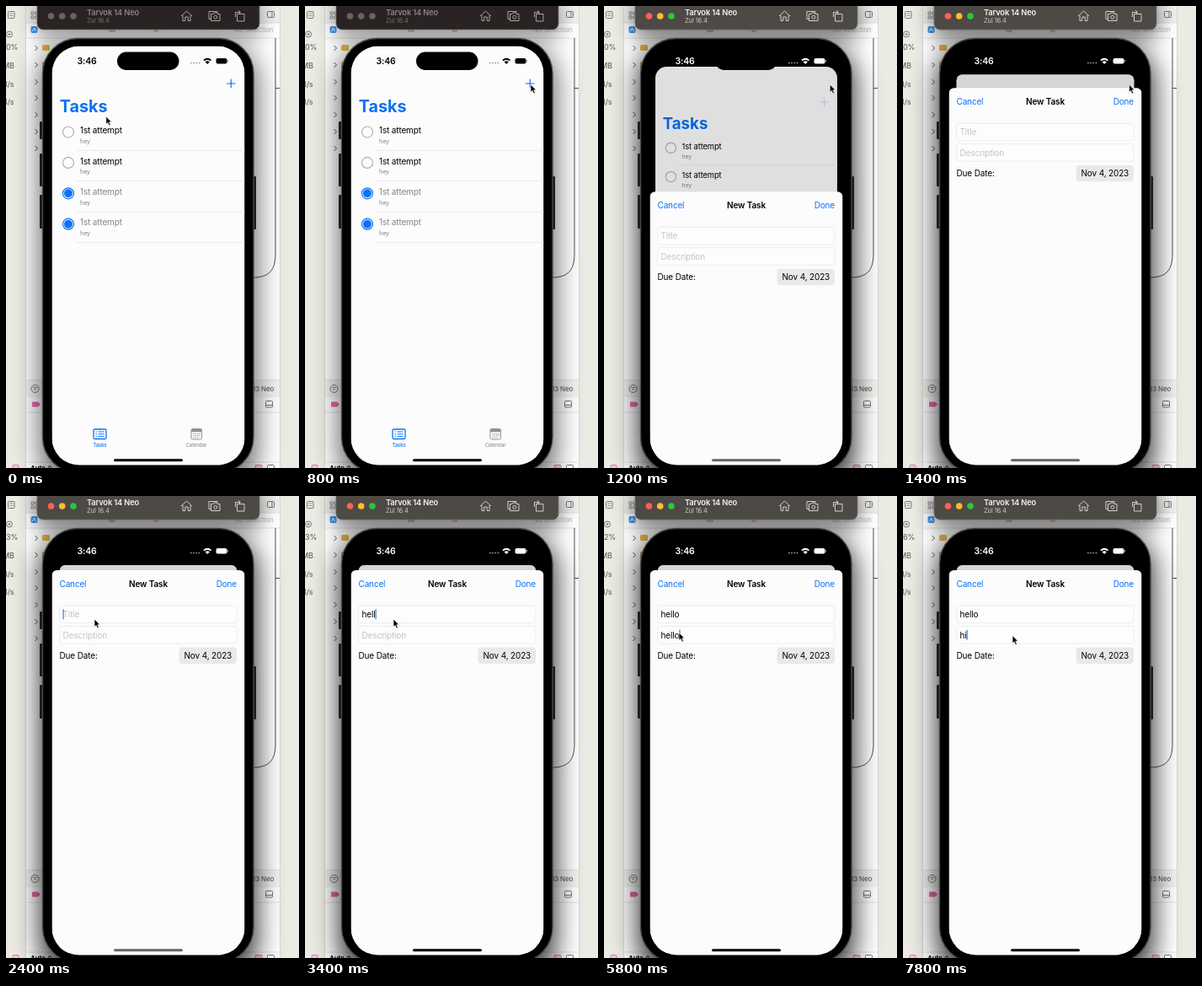
Animation, 348 px wide and 548 px high, one loop 8 s. Source, as an HTML page:

```html
<!DOCTYPE html>
<html lang="en">
<head>
<meta charset="utf-8">
<title>Task list demo</title>
<style>
  html, body { margin: 0; width: 100%; height: 100%; overflow: hidden; background: #ebebe3; }
  svg { display: block; width: 100vw; height: 100vh; }
  text { font-family: Inter, Roboto, sans-serif; font-size: 10px; letter-spacing: -.015em; white-space: pre; }
  .bold { font-weight: 600; }
  .blue { fill: #0a72f2; }
  .line { fill: none; stroke: #77777a; stroke-width: 1; }
  .note { font-size: 7.2px; fill: #85858a; }
  .tab { font-size: 5.9px; font-weight: 500; text-anchor: middle; }
  .side { font-size: 9px; fill: #55554f; }
  .field { fill: #fdfdfe; stroke: #e9e9ec; stroke-width: .8; }
</style>
</head>
<body>
<svg viewBox="0 0 348 548" preserveAspectRatio="none">
  <defs>
    <clipPath id="screen"><rect x="54.500" y="47.500" width="229" height="497" rx="32"/></clipPath>
    <filter id="blur" x="-40%" y="-20%" width="180%" height="140%"><feGaussianBlur stdDeviation="16"/></filter>
    <filter id="barBlur" x="-30%" y="-150%" width="160%" height="400%"><feGaussianBlur stdDeviation="12"/></filter>
  </defs>

  <!-- editor window behind the phone -->
  <rect width="348" height="548" fill="#ebebe3"/>
  <rect x="24" width="301.500" height="548" fill="#fff"/>
  <rect x="24" width="301.500" height="20" fill="#f0f0ef"/>
  <path d="M24 20H325M24 38H325M24 443.500H325M24 463H325M24 482H325M24 541H325" stroke="#dededd" stroke-width=".8"/>
  <rect x="24" y="444" width="301.500" height="19" fill="#f3f3f2"/>
  <path d="M23.500 0V548M325.500 0V548" stroke="#d2d2cd" stroke-width=".8"/>
  <g class="line">
    <rect x="2.500" y="6.500" width="7.500" height="8" rx="1"/>
    <path d="M4 9H8.500M4 11.500H8.500" stroke-width=".7"/>
    <path d="M30 7h3v3h-3zM35 7h3v3h-3zM30 12h3v3h-3zM35 12h3v3h-3z" stroke-width=".8"/>
    <rect x="310.500" y="6.500" width="8" height="7" rx="1"/>
    <path d="M316 6.500V13.500"/>
    <circle cx="4" cy="33.500" r="3.500"/>
    <path d="M2.500 33.500H5.500M4 32V35"/>
    <circle cx="34.500" cy="454" r="4.500"/>
    <path d="M32 452.500H37M33 454.300H36M34 456H35" stroke-width=".8"/>
    <rect x="308.500" y="468.500" width="8" height="7.500" rx="1"/>
    <path d="M309 473.500H316"/>
    <rect x="310.500" y="544.500" width="8" height="7" rx="1"/>
    <g id="chevrons" stroke="#55555a"></g>
  </g>
  <rect x="29.500" y="24" width="8" height="8" rx="2" fill="#3b95f2"/>
  <path d="M31.500 30L33.500 26L35.500 30" fill="none" stroke="#fff"/>
  <rect x="43" y="46" width="9" height="7" rx="1.500" fill="#e5b54b"/>
  <rect x="43" y="66" width="6" height="8" rx="1" fill="#e79a52"/>
  <path d="M31 469.500h7l3 3l-3 3h-7z" fill="#ed66ac"/>
  <g fill="#f4c7dc" stroke="#e578ad"><rect x="8" y="544.500" width="7" height="7" rx="1"/><rect x="296" y="544.500" width="8" height="7" rx="1"/></g>
  <path d="M320 38V294C320 314 312 322 293 322M320 97.500H325" fill="none" stroke="#3c3c3c" stroke-width=".9"/>
  <text class="side" id="load" x="0" y="52">0%</text>
  <text class="side" x="-4" y="74">MB</text>
  <text class="side" x="-4" y="96">B/s</text>
  <text class="side" x="-4" y="117">B/s</text>
  <text x="29" y="551" class="bold" style="font-size:8px">Auto ⌃</text>
  <text x="293" y="456.700" style="font-size:8px" fill="#4b4b4b">13 Neo</text>
  <g opacity=".5">
    <rect x="122" y="25" width="8" height="6" rx="1" fill="#999"/>
    <rect x="175" y="25" width="6" height="6" rx="1" fill="#e9954b"/>
    <text x="271" y="31" style="font-size:8px" fill="#777">No Selection</text>
  </g>

  <!-- phone body -->
  <g id="shadow">
    <rect x="40" y="46" width="258" height="526" rx="42" filter="url(#blur)"/>
    <rect x="35" y="-10" width="268" height="48" rx="8" opacity=".65" filter="url(#barBlur)"/>
  </g>
  <g fill="#1b1b1c">
    <rect x="40" y="137" width="5" height="21" rx="1"/><rect x="40" y="175" width="5" height="39" rx="1"/>
    <rect x="40" y="224" width="5" height="40" rx="1"/><rect x="292" y="202" width="5" height="63" rx="1"/>
  </g>
  <rect x="43.500" y="38.500" width="250.500" height="515" rx="42" stroke="#48484a" stroke-width="1.400"/>

  <g clip-path="url(#screen)">
    <g id="list">
      <rect id="card" x="54.500" y="47.500" width="229" height="500" fill="#fcfcfd"/>
      <path id="plus" d="M262 92H272.500M267.250 86.800V97.200" stroke="#0a72f2" stroke-width="1.200"/>
      <text x="63.700" y="126.300" class="blue" style="font-size:19.800px;font-weight:700;letter-spacing:0">Tasks</text>
      <g id="rows"></g>
      <g fill="none" stroke="#0a72f2">
        <rect x="104" y="502" width="15" height="11.500" rx="1.500" stroke-width="1.300"/>
        <path d="M106.500 505H108M109.500 505H116.500M106.500 507.800H108M109.500 507.800H116.500M106.500 510.600H108M109.500 510.600H116.500"/>
      </g>
      <rect x="220" y="501.500" width="12.500" height="12.500" rx="1.800" fill="none" stroke="#929296"/>
      <path d="M220 503.500H232.500" stroke="#929296" stroke-width="3.500"/>
      <path d="M222.500 507.500H231M222.500 509.700H231M222.500 511.900H229" stroke="#929296" stroke-dasharray="1.300 1"/>
      <text class="tab blue" x="111.500" y="522.500">Tasks</text>
      <text class="tab" x="226" y="522.500" fill="#929296">Calendar</text>
      <rect id="dim" x="54.500" y="47.500" width="229" height="500"/>
    </g>
    <g id="sheet">
      <rect x="54.500" y="88" width="229" height="480" rx="6" fill="#fcfcfd"/>
      <text x="63.500" y="108" class="blue">Cancel</text>
      <text x="169" y="108" class="bold" text-anchor="middle">New Task</text>
      <text x="274" y="108" class="blue" text-anchor="end">Done</text>
      <rect class="field" x="63.500" y="130" width="210.500" height="20.500" rx="3"/>
      <rect class="field" x="63.500" y="154.500" width="210.500" height="20.500" rx="3"/>
      <text id="titleField" x="67.500" y="144"></text>
      <text id="noteField" x="67.500" y="168.500"></text>
      <rect id="caret" width="1.200" height="12" fill="#3978e8"/>
      <text x="63.500" y="193">Due Date:</text>
      <rect x="205.500" y="179.500" width="68.500" height="19.500" rx="4" fill="#e9e9eb"/>
      <text x="239.800" y="193" text-anchor="middle">Nov 4, 2023</text>
    </g>
    <rect id="home" x="128" y="537.200" width="82" height="3" rx="1.500"/>
  </g>

  <!-- status bar -->
  <rect x="132" y="54.500" width="73.500" height="21.500" rx="10.750"/>
  <g id="status">
    <text x="96" y="69" class="bold" text-anchor="middle" style="font-size:10.500px">3:46</text>
    <path d="M219 67.500H231" stroke="#9a9a9d" stroke-width="1.500" stroke-dasharray="1.700 1.500"/>
    <path d="M234.300 64Q239.200 59.600 244.100 64L242.800 65.300Q239.200 62 235.600 65.300ZM236.600 66.300Q239.200 64 241.800 66.300L239.200 69Z"/>
    <rect x="249.500" y="62" width="13" height="6.500" rx="2"/>
    <path d="M263.500 64V66.500" stroke="#99999c"/>
  </g>

  <!-- simulator title bar -->
  <rect id="bar" x="37" y="-12" width="264" height="40" rx="7" stroke="#6b6765" stroke-width=".7"/>
  <g id="lights"><circle cx="53.500" cy="12" r="3.800"/><circle cx="66.700" cy="12" r="3.800"/><circle cx="80" cy="12" r="3.800"/></g>
  <g id="barText">
    <text x="96" y="11" style="font-size:9.300px;font-weight:600">Tarvok 14 Neo</text>
    <text x="96" y="20" style="font-size:7.500px" opacity=".75">Zul 16.4</text>
    <g fill="none" stroke="#d3cfcd" stroke-width="1">
      <path d="M208 12L214.500 6L221 12M210 11V17.500H212.800V13H216.200V17.500H219V11"/>
      <path d="M243 15.500H241V6.500H251V8.500M243.500 9.500H246L247 8H250L251 9.500H254V17.500H243.500Z"/>
      <circle cx="248.800" cy="13.300" r="2"/>
      <path d="M274.500 9.500H283V18H274.500ZM272.500 13V7.500H278M276 5.200L278.500 7.500L276 9.500"/>
    </g>
  </g>
  <path id="cursor" d="M0 0V9.300L2.100 7.400L3.700 11L5.400 10.200L3.800 6.700H6.700Z" stroke="#fff" stroke-width=".7"/>
</svg>

<script>
const LOOP = 8000, STEP = 200;
const $ = id => document.getElementById(id);
const set = (id, attrs) => Object.entries(attrs).forEach(([k, v]) => $(id).setAttribute(k, v));

$('chevrons').innerHTML = [50, 70, 90, 109, 129, 149, 169]
  .map(y => `<path d="M34.500 ${y - 3}l3 3l-3 3"/>`).join('');

$('rows').innerHTML = [false, false, true, true].map((done, i) => `
  <g transform="translate(0 ${i * 36.4})">
    <circle cx="74" cy="149.500" r="6.500" fill="none" stroke="${done ? '#0a72f2' : '#b1b1b5'}" stroke-width="1.200"/>
    ${done ? '<circle cx="74" cy="149.500" r="5" class="blue"/>' : ''}
    <text x="88" y="151.300" fill="${done ? '#858589' : '#000'}">1st attempt</text>
    <text x="88" y="163" class="note">hey</text>
    <path d="M83 171.300H284" stroke="#e2e2e5" stroke-width=".7"/>
  </g>`).join('');

// [time, x, y]
const path = [
  [100, 118.8, 131], [800, 268, 93], [1600, 268.5, 93], [2200, 105, 146],
  [3700, 105, 146], [4200, 89, 162], [5900, 89, 162], [6500, 130, 165.5]
];

function cursorAt(t) {
  const next = path.findIndex(p => p[0] > t);
  if (next <= 0) return path.at(next).slice(1);
  const [t0, x0, y0] = path[next - 1], [t1, x1, y1] = path[next];
  const u = (t - t0) / (t1 - t0), e = u * u * (3 - 2 * u);
  return [x0 + (x1 - x0) * e, y0 + (y1 - y0) * e];
}

// Last value whose start time has passed
const latest = (t, list) => list.filter(([start]) => start <= t).at(-1)[1];
const typed = (t, start) => 'hello'.slice(0, Math.max(0, Math.floor((t - start) / STEP) + 1));

function noteAt(t) {
  if (t >= 7400) return 'hi';
  return t < 6400 ? typed(t, 5000) : 'hello'.slice(0, Math.max(1, 4 - (t - 6400) / STEP));
}

function fill(id, value, placeholder) {
  $(id).textContent = value || placeholder;
  $(id).setAttribute('fill', value ? '#000' : '#c3c3c7');
}

function draw(t) {
  const focused = t >= 1000;
  set('shadow', { opacity: focused ? .8 : .6 });
  set('bar', { fill: focused ? '#4d4945' : '#292423' });
  set('barText', { fill: focused ? '#f5f2f0' : '#aaa4a1', opacity: focused ? 1 : .75 });
  const colors = focused ? ['#ff5f57', '#febc2e', '#28c840'] : Array(3).fill('#686260');
  [...$('lights').children].forEach((c, i) => c.setAttribute('fill', colors[i]));

  const k = Math.max(0, (t - 1050) / 60);
  const p = 1 - (1 + k) * Math.exp(-k);
  set('list', { transform: `translate(169 ${47.5 + 34.5 * p}) scale(${1 - .08 * p}) translate(-169 -47.5)` });
  set('card', { rx: 32 - 25 * p });
  set('dim', { rx: 32 - 25 * p, opacity: .16 * p });
  set('plus', { opacity: t >= 1000 ? .25 : 1 });
  set('sheet', { transform: `translate(0 ${460 * (1 - p)})` });
  set('status', { fill: p > .5 ? '#fff' : '#000' });
  set('home', { fill: t >= 1200 && t < 2600 ? '#666' : '#000' });

  const title = typed(t, 2800), note = noteAt(t), onNote = t >= 4800;
  fill('titleField', title, 'Title');
  fill('noteField', note, 'Description');
  const active = onNote ? note : title;
  const width = active ? $(onNote ? 'noteField' : 'titleField').getComputedTextLength() : 0;
  set('caret', { x: 67.5 + width, y: onNote ? 158.7 : 134.2, opacity: t >= 2200 ? 1 : 0 });

  $('load').textContent = latest(t, [[0, 0], [1800, 3], [3800, 1], [5000, 2], [7400, 6]]) + '%';
  set('cursor', { transform: `translate(${cursorAt(t)})` });
}

const origin = performance.now();
function tick() {
  const t = (performance.now() - origin) % LOOP;
  draw(Math.floor(t / STEP) * STEP);
  requestAnimationFrame(tick);
}
tick();
</script>
</body>
</html>
```
